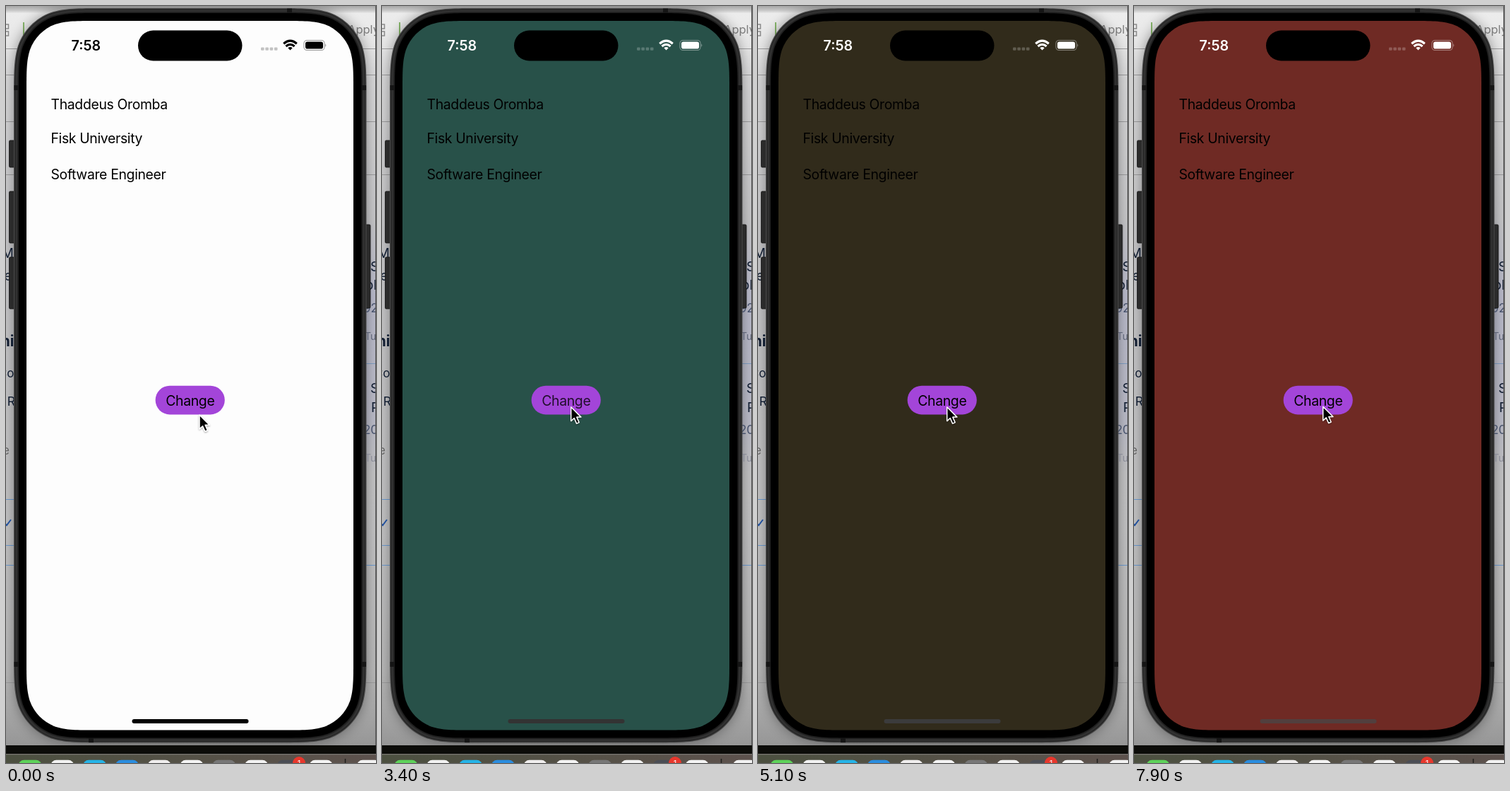
Write an HTML page that moves like this. It is 524 by 1070 pixels and loops after 8000 ms.

```html
<!DOCTYPE html>
<html lang="en">
<head>
<meta charset="utf-8">
<title>Colour change button</title>
<style>
  html, body { margin: 0; width: 100%; height: 100%; overflow: hidden; background: #111; }
  svg { display: block; width: 524px; height: 1070px; font-family: Inter, "Liberation Sans", sans-serif; }
  .ui { font-size: 19.4px; letter-spacing: -.34px; }
  .back { font-size: 19px; fill: #111d31; }
</style>
</head>
<body>
<svg viewBox="0 0 524 1070">
  <defs>
    <linearGradient id="page" x1="0" y1="0" x2="0" y2="1">
      <stop offset="0" stop-color="#a6a6a6"/>
      <stop offset=".006" stop-color="#c8c8c8"/>
      <stop offset=".01" stop-color="#ececec"/>
      <stop offset=".057" stop-color="#e6e6e6"/>
      <stop offset=".1" stop-color="#d8d8d9"/>
      <stop offset=".3" stop-color="#c6c6c8"/>
      <stop offset=".7" stop-color="#c3c3c4"/>
      <stop offset=".9" stop-color="#b8b8b8"/>
      <stop offset="1" stop-color="#969696"/>
    </linearGradient>
    <linearGradient id="tint" x1="0" y1="0" x2="0" y2="1">
      <stop offset="0" stop-color="#aeb0cc" stop-opacity="0"/>
      <stop offset=".3" stop-color="#aeb0cc" stop-opacity=".55"/>
      <stop offset=".8" stop-color="#aeb0cc" stop-opacity=".4"/>
      <stop offset="1" stop-color="#aeb0cc" stop-opacity="0"/>
    </linearGradient>
    <linearGradient id="shelf">
      <stop offset="0" stop-color="#4c5040"/>
      <stop offset="1" stop-color="#5d524d"/>
    </linearGradient>
    <filter id="soft" x="-10%" y="-10%" width="120%" height="120%"><feGaussianBlur stdDeviation="9"/></filter>
    <filter id="drop" x="-50%" y="-50%" width="200%" height="200%"><feDropShadow dx="0" dy="1.2" stdDeviation="1.1" flood-opacity=".35"/></filter>
  </defs>

  <rect width="524" height="1046" fill="url(#page)"/>
  <rect x="505" y="300" width="19" height="360" fill="url(#tint)"/>
  <g id="rules"></g>
  <g fill="none" stroke="#8a8a8a" stroke-width="1.5">
    <path d="M-2 26H3.5V32H-2M-2 36H3.5V42H-2"/>
    <path d="M25 23V43" stroke="#86b56a" stroke-width="2"/>
  </g>
  <text x="484" y="38.5" font-size="16.5" fill="#7d7d7d">Apply</text>
  <path id="shade" fill="#000" opacity=".36" filter="url(#soft)"/>

  <g class="back">
    <g text-anchor="end">
      <text x="11" y="356">M</text>
      <text x="8.5" y="388">e</text>
      <text x="11.5" y="481" font-size="21" font-weight="700">ni</text>
      <text x="11.5" y="524.5" font-size="17">Co</text>
      <text x="13" y="564.5" font-size="17.5">'R</text>
      <text x="5" y="634" font-size="17" fill="#666">e</text>
    </g>
    <path d="M-2 731L1 734L7 726" fill="none" stroke="#1f4f9c" stroke-width="2"/>
    <text x="516" y="375">S</text>
    <text x="509" y="401">ol</text>
    <text x="506" y="433" font-size="17" fill="#46516b">92</text>
    <text x="508" y="472" font-size="14" fill="#5f6578">Tu</text>
    <text x="516" y="547">S</text>
    <text x="517" y="574">P</text>
    <text x="506" y="605" font-size="17" fill="#46516b">20</text>
    <text x="508" y="644" font-size="14" fill="#8b8d99">Tu</text>
  </g>
  <path d="M523.5 0V1045" stroke="#555"/>

  <rect y="1045" width="524" height="25" fill="#0c0c09"/>
  <rect y="1057" width="524" height="13" fill="url(#shelf)"/>
  <rect y="1057" width="524" height="1.3" fill="#777570"/>
  <g id="dock"></g>
  <path d="M480.5 1064V1070" stroke="#1f1f1c" stroke-width="1.5"/>
  <circle cx="415" cy="1070" r="9" fill="#e8372c"/>
  <text x="415" y="1074" font-size="11" fill="#fff" text-anchor="middle">1</text>

  <g fill="#2b2b2b" stroke="#121212" stroke-width=".8">
    <rect x="4.5" y="190" width="9" height="38" rx="1.5"/>
    <rect x="4.5" y="262" width="9" height="73" rx="1.5"/>
    <rect x="4.5" y="355" width="9" height="73" rx="1.5"/>
    <rect x="508" y="309" width="8" height="118" rx="1.5"/>
  </g>
  <g id="body"></g>
  <g fill="#151515">
    <rect x="398" y="3.5" width="7" height="6"/>
    <rect x="117" y="1035" width="7" height="6"/>
    <rect x="11.5" y="112" width="6" height="7"/>
    <rect x="504" y="112" width="6" height="7"/>
    <rect x="11.5" y="927" width="6" height="7"/>
    <rect x="504" y="927" width="6" height="7"/>
  </g>

  <path id="screen"/>
  <rect x="187" y="34.5" width="147.5" height="43" rx="21.5"/>
  <g id="status">
    <text x="113.3" y="63" font-size="19.7" font-weight="600" text-anchor="middle">7:58</text>
    <g fill="none" stroke="currentColor" stroke-width="3.1">
      <path d="M393.2 53.2Q402.5 45.2 411.8 53.2"/>
      <path d="M396.4 57Q402.5 51.6 408.6 57"/>
    </g>
    <path d="M402.5 62.6L399.3 59.3Q402.5 56.7 405.7 59.3Z"/>
    <rect x="422" y="48.5" width="29" height="14" rx="4.3" fill="none" stroke="currentColor" stroke-opacity=".4" stroke-width="1.1"/>
    <rect x="424" y="50.5" width="25" height="10" rx="2.8"/>
    <path d="M452.3 53.2Q454.3 55.5 452.3 57.8Z" opacity=".45"/>
  </g>
  <g id="dots"></g>

  <g class="ui">
    <text x="63.5" y="146">Thaddeus Oromba</text>
    <text x="63.5" y="194">Fisk University</text>
    <text x="63.5" y="244.5">Software Engineer</text>
  </g>
  <rect x="211.6" y="536.8" width="98.2" height="40.6" rx="20.3" fill="#a345d9"/>
  <text id="label" class="ui" x="260.8" y="564.5" text-anchor="middle">Change</text>
  <rect id="home" x="178.5" y="1008" width="165" height="6" rx="3"/>
  <path id="cursor" d="M0 0V19.8L4.5 15.7L7.9 23.3L11.4 21.8L8.1 14.3H14.2Z" stroke="#fff" stroke-width="1.5" stroke-linejoin="round" filter="url(#drop)"/>
</svg>
<script>
const LOOP = 8000, STEP = 100;
const $ = id => document.getElementById(id);

function add(parent, tag, attrs) {
  const el = document.createElementNS("http://www.w3.org/2000/svg", tag);
  for (const k in attrs) el.setAttribute(k, attrs[k]);
  $(parent).appendChild(el);
  return el;
}

// Rounded rectangle with continuous-curvature corners.
function squircle(x, y, w, h, r) {
  const corner = [[1.5287, 0], [1.0885, 0], [.8684, 0], [.6315, .0749], [.3728, .1691],
                  [.1691, .3728], [.0749, .6315], [0, .8684], [0, 1.0885], [0, 1.5287]];
  const place = (right, low, flip) => {
    const list = corner.map(([a, b]) => [
      right ? x + w - a * r : x + a * r,
      low ? y + h - b * r : y + b * r
    ].map(n => n.toFixed(2)).join(" "));
    if (flip) list.reverse();
    return list[0] + "C" + list.slice(1).join(" ");
  };
  return "M" + place(1, 0, 0) + "L" + place(1, 1, 1) + "L" + place(0, 1, 0) + "L" + place(0, 0, 1) + "Z";
}

const shell = inset => squircle(11 + inset, 3 + inset, 499.5 - 2 * inset, 1038.5 - 2 * inset, 83 - inset);
$("shade").setAttribute("d", shell(0));
[[0, "#4a4a4a"], [1.2, "#242424"], [2.5, "#313131"], [5.2, "#202020"], [7, "#000"]]
  .forEach(([inset, fill]) => add("body", "path", { d: shell(inset), fill }));
$("screen").setAttribute("d", squircle(29, 21, 463, 1002.5, 65));

[60, 97, 163, 238, 956, 1027].forEach(y =>
  add("rules", "rect", { y, width: 524, height: 1, fill: "#9c9c9d" }));
[697, 762, 790].forEach(y =>
  add("rules", "rect", { y, width: y === 790 ? 524 : 20, height: 1, fill: "#6b9bd2" }));
add("rules", "rect", { x: 500, y: 505, width: 24, height: 1, fill: "#7f9fc4" });

["#5ed35a", "#f2f2f2", "#25b4e8", "#2a8de0", "#f0eeee", "#f4f4f4",
 "#777", "#f2f2f2", "#4a4d55", "#f4f4f4"].forEach((fill, i) =>
  add("dock", "rect", { x: 17.5 + 45.8 * i, y: 1065.8, width: 33, height: 20, rx: 8, fill }));
add("dock", "rect", { x: 497, y: 1065.8, width: 33, height: 20, rx: 8, fill: "#f2f2f2" });

const dots = [0, 1, 2, 3].map(i =>
  add("dots", "rect", { x: 361 + 6.3 * i, y: 58.4, width: 4.6, height: 4.4, rx: 1.2, opacity: .23 }));

const scenes = [
  { at: 0,    back: "#fdfdfd", home: "#000" },
  { at: 1800, back: "#285149", home: "#333333" },
  { at: 3500, back: "#4c2122", home: "#433b3c" },
  { at: 4800, back: "#312b1b", home: "#3b3b3c" },
  { at: 6800, back: "#6f2a24", home: "#523f3e" }
];

const clamp = v => Math.max(0, Math.min(1, v));
const ease = v => v * v * (3 - 2 * v);
const mix = (a, b, k) => a + (b - a) * k;

function draw(t) {
  const scene = scenes.filter(s => s.at <= t).pop();
  $("screen").setAttribute("fill", scene.back);
  $("home").setAttribute("fill", scene.home);

  // Status icons turn from black to white shortly after the first change.
  const v = Math.round(255 * ease(clamp((t - 1800) / 300)));
  const ink = `rgb(${v},${v},${v})`;
  $("status").setAttribute("fill", ink);
  $("status").style.color = ink;
  dots.forEach(d => d.setAttribute("fill", ink));

  const pressed = scenes.some(s => s.at && t >= s.at - 100 && t < s.at);
  $("label").setAttribute("fill-opacity", pressed ? .8 : 1);

  const reach = ease(clamp((t - 700) / 900)), drift = ease(clamp((t - 1900) / 800));
  const x = mix(274, 270.5, reach) - 2.8 * drift;
  const y = mix(578, 568.3, reach) - 1.5 * drift - .6 * clamp((t - 5600) / 800);
  $("cursor").setAttribute("transform", `translate(${x.toFixed(2)} ${y.toFixed(2)})`);
}

const start = performance.now();
function tick() {
  const t = (performance.now() - start) % LOOP;
  draw(Math.floor(t / STEP) * STEP);
  requestAnimationFrame(tick);
}
draw(0);
requestAnimationFrame(tick);
</script>
</body>
</html>
```
